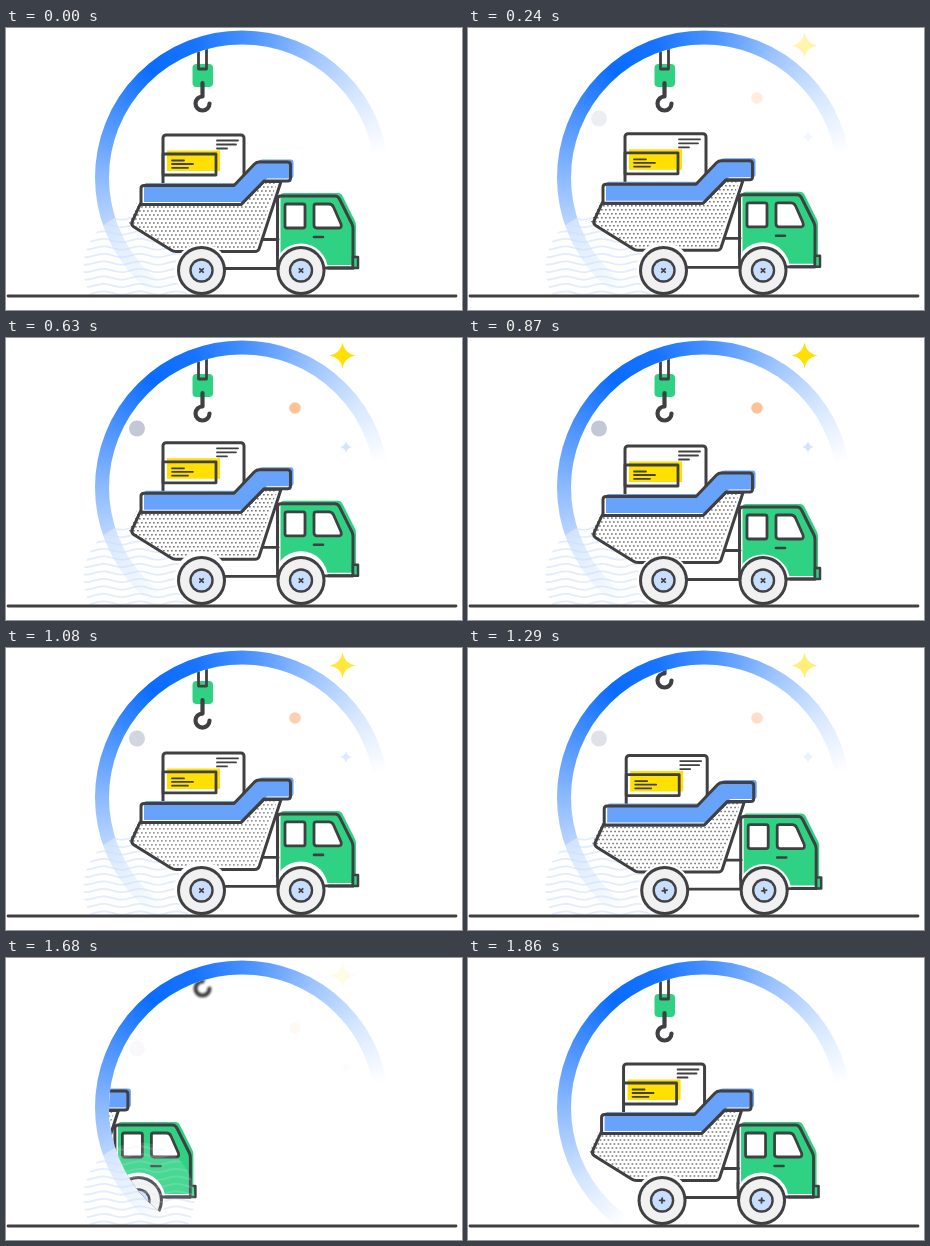
Write an HTML page with a canvas that moves like this. It is 456 px wide and 282 px high and loops after 2.1 s.

```html
<!DOCTYPE html>
<html lang="en">
<head>
<meta charset="utf-8">
<title>Dump truck</title>
<style>
html, body { margin: 0; width: 100%; height: 100%; overflow: hidden; background: #fff; }
canvas { display: block; width: 456px; height: 282px; }
</style>
</head>
<body>
<canvas></canvas>
<script>
const W = 456, H = 282, LOOP = 2100, STEP = 30, LAST = 1860;
const INK = '#404042', GREEN = '#2fd283', BLUE = '#68a3fb', YELLOW = '#ffe000';
const canvas = document.querySelector('canvas');
const c = canvas.getContext('2d');
const dpr = window.devicePixelRatio || 1;
canvas.width = W * dpr;
canvas.height = H * dpr;

const rad = deg => deg * Math.PI / 180;
const span = (t, from, to) => Math.min(1, Math.max(0, (t - from) / (to - from)));
const ease = u => (1 - Math.cos(Math.PI * u)) / 2;

const tray = new Path2D('M135 176.500V160.500Q135 157.500 138 157.500H228L248.500 136Q250.500 134 253.500 134H281.500Q284.500 134 284.500 137V150Q284.500 153 281.500 153H258L235 176.500Z');
const bed = new Path2D('M134 176.500L126 194Q125 197 128 199L165 222Q167 223.500 170 223.500H249Q252 223.500 253 221L275 153.500H258L235 176.500Z');
const cab = new Path2D('M271.500 240V171Q271.500 168 275 168H329Q332 168 333.500 171L346 196Q347 198 347 201V240Z');
const sideWindow = new Path2D('M281 176H297Q299 176 299 178V198Q299 200 297 200H281Q279 200 279 198V178Q279 176 281 176Z');
const frontWindow = new Path2D('M310 176H323Q326 176 327.500 179L335 196Q336 200 333 200H311Q308 200 308 197V178Q308 176 310 176Z');
const inside = new Path2D('M236 16.500A133 133 0 0 0 236 282.500H369V16.500Z');
const disc = new Path2D();
disc.arc(236, 149.5, 133, 0, 7);

function scoped(draw) {
  c.save();
  draw();
  c.restore();
}

function fill(path, color, dx = 0, dy = 0) {
  scoped(() => {
    c.translate(dx, dy);
    c.fillStyle = color;
    c.fill(path);
  });
}

function stroke(path, width = 3, color = INK) {
  c.lineWidth = width;
  c.strokeStyle = color;
  c.stroke(typeof path === 'string' ? new Path2D(path) : path);
}

function circle(x, y, r, color) {
  c.beginPath();
  c.arc(x, y, r, 0, 7);
  c.fillStyle = color;
  c.fill();
}

function box(x, y, w, h, r, color) {
  const path = new Path2D();
  path.roundRect(x, y, w, h, r);
  if (color) fill(path, color);
  return path;
}

// Stops pair an angle from the top, clockwise, with an opacity.
function ring() {
  const g = c.createConicGradient(rad(125), 236, 149.5);
  for (const [deg, alpha] of [[-145, 0], [-120, 0.18], [-90, 0.47], [-40, 1], [-20, 0.95], [5, 0.72], [30, 0.4], [55, 0.16], [80, 0]])
    g.addColorStop((deg + 145) / 360, `rgba(10,108,255,${alpha})`);
  c.beginPath();
  c.arc(236, 149.5, 140, 0, 7);
  c.lineWidth = 14;
  c.strokeStyle = g;
  c.stroke();
}

function sparkle(x, y, r, color) {
  c.beginPath();
  c.moveTo(x, y - r);
  for (let i = 1; i <= 4; i++) {
    const a = rad(i * 90 - 90), m = a - rad(45), k = r * 0.2;
    c.quadraticCurveTo(x + k * Math.cos(m), y + k * Math.sin(m), x + r * Math.cos(a), y + r * Math.sin(a));
  }
  c.fillStyle = color;
  c.fill();
}

function ornaments(alpha) {
  c.globalAlpha = alpha;
  sparkle(336.5, 17.5, 13, YELLOW);
  sparkle(340, 109, 6, '#d3e4ff');
  circle(131, 90.5, 8, '#c3c8d6');
  circle(289, 70, 5.8, '#ffc297');
}

function hook(y, blur) {
  c.clip(disc);
  c.translate(0, y);
  if (blur) c.filter = 'blur(1px)';
  box(186.5, 36, 20.5, 23, 4, GREEN);
  stroke('M192.500 -40V41H200.500V-40', 2.8);
  stroke('M196.500 55V68.500A7 7 0 1 0 203.500 75.500', 4.2);
}

function dots() {
  scoped(() => {
    c.translate(-3, -2);
    c.clip(bed);
    c.lineCap = 'butt';
    c.setLineDash([1.7, 2.3]);
    for (let y = 157, i = 0; y < 224; y += 4, i++) {
      c.lineDashOffset = i % 2 * 2;
      stroke(`M122 ${y}H280`, 1.4, '#777');
    }
  });
}

function parcel() {
  stroke(box(157, 107, 81, 52, 3, '#fff'));
  box(161, 122.5, 53, 20.5, 0, YELLOW);
  stroke('M157 126H210V147H157Z', 2.8);
  stroke('M166 132.500H178M166 136H187M166 139.800H182M211 112.500H232M211 116.500H230M211 120.500H221', 1.8);
}

function body() {
  stroke('M257 211.500H272', 2.8);
  parcel();
  fill(bed, '#fff');
  dots();
  stroke(bed);
  fill(tray, '#fff');
  fill(tray, BLUE, 3, -2.5);
  stroke(tray);
  fill(cab, GREEN, 3, -3);
  stroke(cab);
  for (const pane of [sideWindow, frontWindow]) {
    fill(pane, '#fff');
    stroke(pane, 2.8);
  }
  stroke('M308 209H317', 2.6);
  for (const x of [195.5, 295]) circle(x, 242.5, 27, '#fff');
  stroke('M219 240.500H271.500V226M318 240H347', 2.8);
  stroke(box(347, 229, 5, 11, 0, GREEN), 2.5);
}

function wheel(x, turn) {
  circle(x, 242.5, 24.5, INK);
  circle(x, 242.5, 21.5, '#f1f1f2');
  circle(x, 242.5, 12.2, INK);
  circle(x, 242.5, 9.8, '#c8deff');
  scoped(() => {
    c.translate(x, 242.5);
    c.rotate(turn);
    stroke('M-1.700 -1.700L1.700 1.700M1.700 -1.700L-1.700 1.700', 1.8);
  });
}

function truck(x, bob) {
  c.clip(inside);
  c.translate(x, 0);
  scoped(() => {
    c.translate(0, bob);
    body();
  });
  wheel(195.5, x * 0.5);
  wheel(295, x * 0.5);
}

function waves(alpha) {
  c.globalAlpha = alpha;
  c.beginPath();
  c.arc(133, 240, 55.5, 0, 7);
  c.clip();
  c.fillStyle = 'rgba(255,255,255,.35)';
  c.fillRect(77, 184, 113, 82);
  for (let y = 190; y < 266; y += 7.5) {
    c.beginPath();
    for (let x = 77; x <= 190; x += 2) c.lineTo(x, y + 1.6 * Math.sin((x - 70) / 5.8));
    c.lineWidth = 1.8;
    c.strokeStyle = 'rgba(205,223,250,.6)';
    c.stroke();
  }
}

// Leaves on the right, then returns from the left.
function truckX(t) {
  if (t < 1600) return 260 * span(t, 1230, 1590) ** 3;
  return -250 * (1 - span(t, 1645, 1907)) ** 3;
}

function render(t) {
  const bob = t < 1620 ? 1.6 * Math.cos(2 * Math.PI * (t - 870) / 480) - 0.6 : -1;
  const lift = -60 * (ease(span(t, 1020, 1440)) - ease(span(t, 1590, 1860)));
  c.setTransform(dpr, 0, 0, dpr, 0, 0);
  c.fillStyle = '#fff';
  c.fillRect(0, 0, W, H);
  c.lineCap = c.lineJoin = 'round';
  ring();
  scoped(() => ornaments(span(t, 60, 630) * (1 - span(t, 870, 1770))));
  scoped(() => hook(lift, t > 1620 && t < 1830));
  const haze = 1 - span(t, 1650, 1860);
  scoped(() => waves(haze));
  scoped(() => truck(truckX(t), bob));
  if (t > 1600) scoped(() => waves(0.4 * haze));
  stroke('M2 268H450', 2.8);
}

const start = performance.now();
function tick() {
  const t = (performance.now() - start) % LOOP;
  render(Math.min(LAST, Math.floor(t / STEP) * STEP));
  requestAnimationFrame(tick);
}
tick();
</script>
</body>
</html>
```
